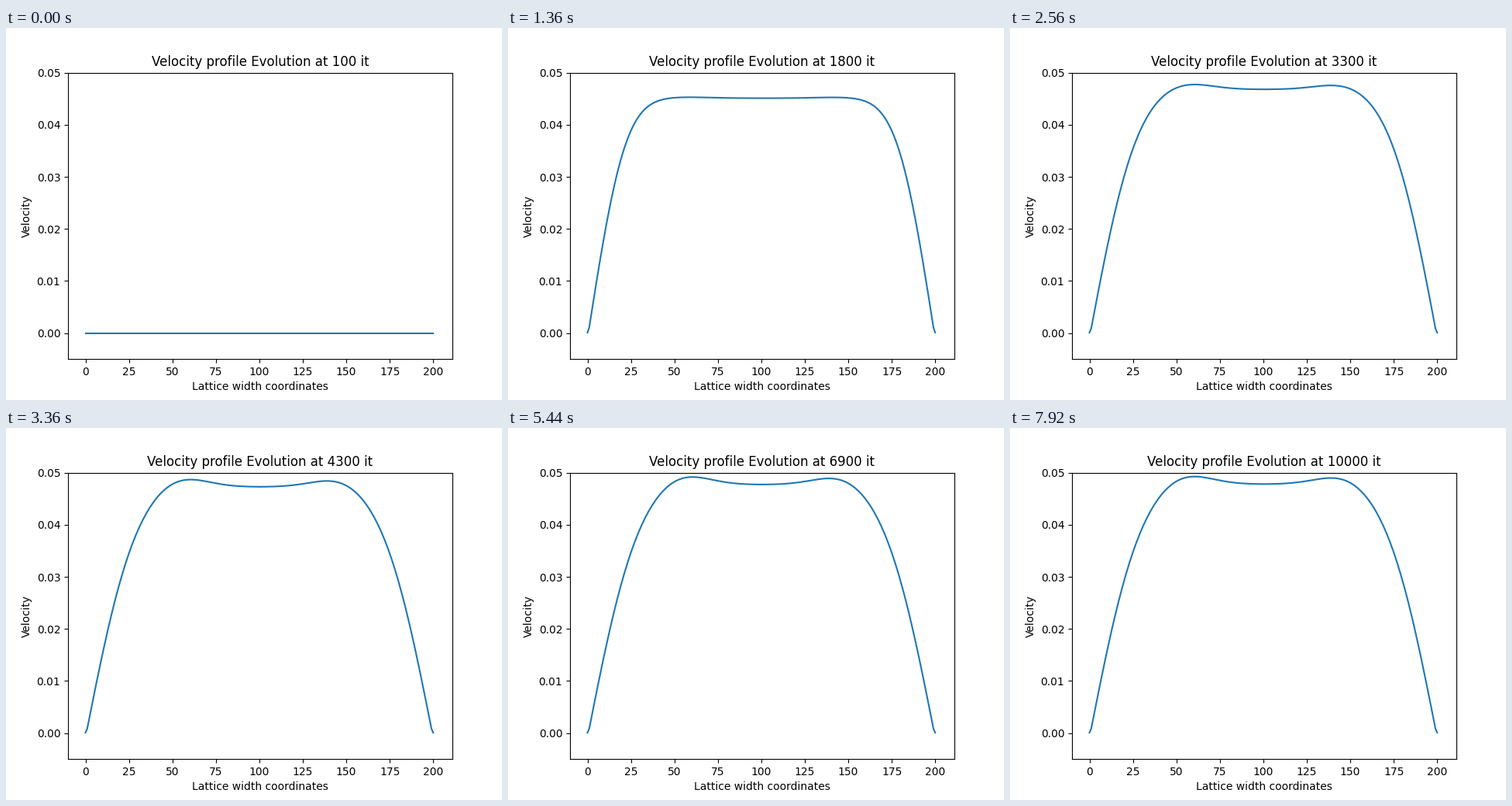
These frames come from a looping animation (640 px wide and 480 px high, 8 s). A matplotlib script:

```python
import math

import numpy as np
import matplotlib.pyplot as plt
from matplotlib.animation import FuncAnimation

FRAMES, INTERVAL = 100, 80
STEPS_PER_FRAME = 100
WIDTH = 200
VISCOSITY = 0.1

ARRIVAL = 173                       # pressure front reaches the section
LAYER_TIME, LAYER_THICKNESS = 4615, 32
INLET_SPEED, CORE_SPEED, CORE_TIME = 0.04, 0.0478, 1537
LEFT_SHOULDER, RIGHT_SHOULDER = 0.0020, 0.0017
PULSE_START, PULSE_END = 960, 1310  # reflected wave passes by
PULSE_SPEED, PULSE_FADE = 0.0117, 400

erf = np.vectorize(math.erf)
x = np.arange(WIDTH + 1)
wall_distance = np.maximum(np.minimum(x, WIDTH - x) - 0.5, 0.04)
shoulder = (np.where(x <= WIDTH / 2, LEFT_SHOULDER, RIGHT_SHOULDER)
            * np.exp(-((wall_distance - 54) / 21) ** 2))


def layer(thickness):
    """Unit speed profile slowed near both walls."""
    return erf(wall_distance / thickness)


def step_response(age):
    """Unit speed step after diffusing from the walls for `age` iterations."""
    if age <= 0:
        return np.zeros(x.size)
    return layer(2 * math.sqrt(VISCOSITY * age))


def velocity(it):
    age = it - ARRIVAL
    if age <= 0:
        return np.zeros(x.size)
    growth = math.sin(math.pi / 2 * min(age / LAYER_TIME, 1))
    core = CORE_SPEED + (INLET_SPEED - CORE_SPEED) * math.exp(-age / CORE_TIME)
    flow = core * layer(LAYER_THICKNESS * math.sqrt(growth))
    pulse = step_response(it - PULSE_START) - step_response(it - PULSE_END)
    fade = math.exp(-max(it - PULSE_END, 0) / PULSE_FADE)
    return flow + growth ** 3.5 * shoulder + PULSE_SPEED * fade * pulse


fig, ax = plt.subplots(figsize=(6.4, 4.8), dpi=100)
line, = ax.plot(x, np.zeros(x.size))
margin = 0.05 * (WIDTH + 1)
ax.set_xlim(-margin, WIDTH + 1 + margin)
ax.set_ylim(-0.005, 0.05)
ax.set_xlabel("Lattice width coordinates")
ax.set_ylabel("Velocity")
title = ax.set_title("")


def update(frame):
    it = (frame + 1) * STEPS_PER_FRAME
    line.set_ydata(velocity(it))
    title.set_text(f"Velocity profile Evolution at {it} it")
    return line, title


animation = FuncAnimation(fig, update, frames=FRAMES, interval=INTERVAL,
                          repeat=True, repeat_delay=0)
plt.show()
```
